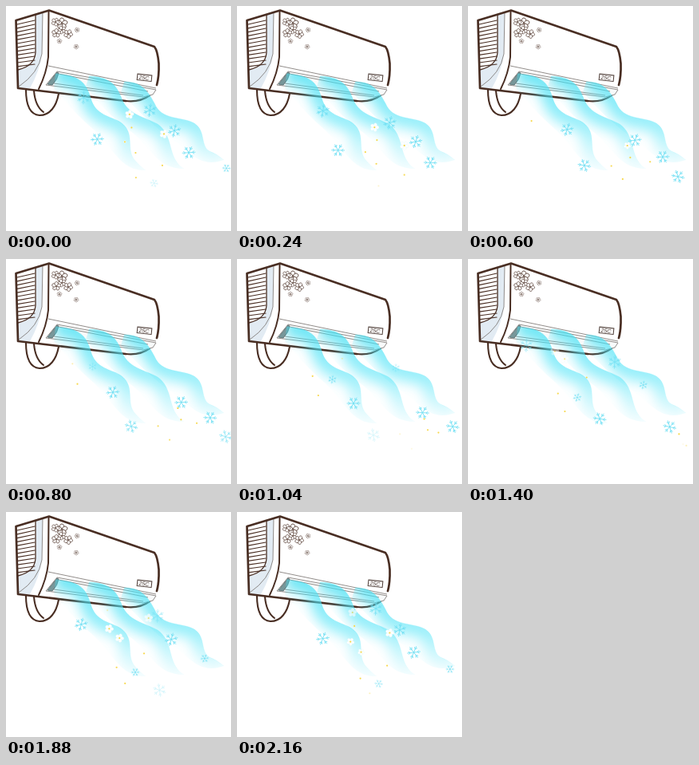
Recreate the animation shown at these times as an HTML page. Size 282x282 px, loop 2.2 s.

```html
<!DOCTYPE html>
<html lang="en">
<head>
<meta charset="utf-8">
<title>Cool breeze</title>
<style>
  html, body { margin: 0; width: 100%; height: 100%; overflow: hidden; background: #fff; }
  svg { display: block; width: 100vw; height: 100vh; }
  .ink { fill: none; stroke: #492e23; stroke-linecap: round; stroke-linejoin: round; }
  .thin { fill: none; stroke: #77706c; stroke-width: .8; }
  text { font: italic 7px "Liberation Sans", Arial, sans-serif; fill: #4b3a34; }
</style>
</head>
<body>
<svg viewBox="0 0 282 282">
  <defs>
    <filter id="soft" filterUnits="userSpaceOnUse" x="0" y="40" width="282" height="242">
      <feGaussianBlur stdDeviation="8"/>
    </filter>
    <linearGradient id="air" gradientUnits="userSpaceOnUse" x1="0" y1="85" x2="0" y2="206">
      <stop offset="0" stop-color="#3fe0f4" stop-opacity=".75"/>
      <stop offset=".55" stop-color="#5ce6f8" stop-opacity=".6"/>
      <stop offset="1" stop-color="#8eeefa" stop-opacity=".1"/>
    </linearGradient>
    <g id="flake" fill="none" stroke="#6fdff3" stroke-width=".1" stroke-linecap="round"></g>
    <g id="petals" fill="#fff" stroke="#d9f6f8" stroke-width=".06"></g>
    <g id="sketch" fill="#fff" stroke="#492e23" stroke-width=".12"></g>
  </defs>

  <!-- drain pipe -->
  <path class="ink" stroke-width="2.1" d="M25 105C25 123 30 136 42 137C55 137 63 126 66 110M35 106C36 119 40 128 47 133"/>

  <!-- cabinet -->
  <path d="M12.5 18L54 5.5L186 51Q192 65 191 85L188 105L172 117L150 119L15 103Z" fill="#fff"/>
  <path d="M37 11L46 8L45 60Q42 82 30 103L15 103V80Q36 75 37 58Z" fill="#e2ebf3"/>
  <path class="thin" d="M46 8L45 60Q41 84 16 101"/>
  <g id="louvers" class="ink" stroke-width="1.2"></g>
  <path class="ink" stroke-width="1.3" d="M37 11V58Q36 75 15 80"/>
  <path class="ink" stroke-width="2" d="M53.5 6L53 64Q51 84 41 104"/>
  <path class="ink" stroke-width="2.7" d="M150 119L15 103L12.5 18L54 5.5L186 51Q190 56 191.5 72Q192 88 189 99"/>
  <path class="ink" stroke-width="2.2" d="M150 119Q168 121 180 112"/>
  <path class="thin" d="M53 75L188 103"/>
  <path d="M64 82L188 105L184 111L172 114L50 99Z" fill="#f8fafa" stroke="#77706c" stroke-width=".8"/>
  <path d="M64 83L52 98L58 99Q65 92 66 84Z" fill="#78979a" stroke="#465f60" stroke-width=".7"/>
  <path class="thin" d="M66 85L178 107M60 97L172 112"/>
  <g transform="rotate(6 173 90)">
    <rect x="164.500" y="86" width="18" height="7.500" fill="#fff" stroke="#4b3a34"/>
    <text x="166.500" y="92.300">25C</text>
  </g>
  <g id="print"></g>

  <g id="wind"></g>
  <g id="drift"></g>
</svg>

<script>
const $ = id => document.getElementById(id);
const range = n => [...Array(n).keys()];
const clamp = v => Math.max(0, Math.min(1, v));
const LOOP = 2.2, CYCLE = 2.3, STEP = .04;

// Unit-size shapes, repeated around the centre
const ring = (n, d) => range(n).map(i => `<path d="${d}" transform="rotate(${i * 360 / n})"/>`).join('');
const petals = ring(5, 'M0 0C-.6 -.35 -.4 -1 0 -1S.6 -.35 0 0Z');
$('flake').innerHTML = ring(6, 'M0 0V-1M-.2 -.8L0 -.55L.2 -.8');
$('petals').innerHTML = petals;
$('sketch').innerHTML = petals + '<circle r=".15"/>';

$('louvers').innerHTML = range(12).map(i => {
  const y = 23 + i * 4.8;
  return `<path d="M14 ${y}L36 ${y - 5 + i * .2}"/>`;
}).join('');

$('print').innerHTML = [[70, 22, 7], [62, 20, 5], [70, 30, 5], [63, 34, 5.5], [78, 35, 5.5],
  [89, 30, 3], [67, 44, 3], [88, 51, 3]].map(([x, y, r], i) =>
  `<use href="#sketch" transform="translate(${x} ${y}) rotate(${i * 25}) scale(${r})"/>`).join('');

// Each stream: its crisp upper edge, then the soft lower side
const streams = [
  ['M62 85C90 87 100 94 106 115C112 138 132 138 144 146C163 160 149 179 162 194Q168 201 175 206',
   'C145 207 135 180 112 157Q85 134 60 103Z'],
  ['M104 88C128 89 138 97 145 116C153 137 174 139 190 148C207 160 204 180 213 194Q217 201 223 204',
   'C190 204 181 178 160 160Q128 138 100 101Z'],
  ['M148 95C169 95 177 105 186 122C195 144 220 138 236 147C251 157 243 175 255 182Q264 185 273 193',
   'C241 204 230 181 208 167Q176 145 144 108Z']
];
$('wind').innerHTML = streams.map(([edge, side], i) => `
  <clipPath id="c${i}"><path d="${edge + side}"/></clipPath>
  <g clip-path="url(#c${i})">
    <path d="${edge}" fill="none" stroke="url(#air)" stroke-width="27" filter="url(#soft)"/>
  </g>
  <path d="${edge}" fill="none" stroke="url(#air)" stroke-width=".8" opacity=".5"/>`).join('');

const kinds = {
  flake: { size: 8, life: 2.15, spin: 25, href: '#flake' },
  mini: { size: 5, life: 1.75, spin: 25, href: '#flake' },
  blossom: { size: 5.5, life: 2.1, spin: 40, href: '#petals', core: true },
  dot: { size: 1, life: 1.9, spin: 0, core: true }
};

// Birth time and place; push and fall are the starting speeds in px/s
const drift = [];
function launch(kind, born, x, y, push = 41, fall = 73) {
  const { href, core } = kinds[kind];
  const g = document.createElementNS('http://www.w3.org/2000/svg', 'g');
  g.innerHTML = (href ? `<use href="${href}"/>` : '') + (core ? '<circle r="1.1" fill="#f7d84b"/>' : '');
  $('drift').append(g);
  drift.push({ ...kinds[kind], kind, g, born, x, y, push, fall });
}

launch('flake', 1.3, 69, 101);
launch('flake', -.15, 91, 104);
launch('flake', 1.25, 177, 119, 45, 69);
launch('flake', 1.8, 186, 125, 48, 66);
launch('flake', 2, 167, 110, 43, 71);
launch('mini', .7, 104, 128, 44, 70);
launch('mini', .95, 194, 131, 55, 63);
launch('blossom', 1.33, 106, 111, 40, 68);
launch('blossom', 1.3, 117, 118);
launch('blossom', 1.75, 173, 124, 43, 70);
launch('blossom', 2.05, 137, 118, 70);
launch('dot', .4, 70, 131, 47, 67);
launch('dot', .75, 81, 128, 46, 67);
launch('dot', 1, 130, 122, 45, 69);
launch('dot', 1.85, 125, 121, 70);

// The wind speeds particles up sideways and slows their fall
function draw(seconds) {
  const time = Math.floor(seconds % LOOP / STEP + .001) * STEP;
  for (const p of drift) {
    const age = time - p.born + (time < p.born ? CYCLE : 0);
    const x = p.x + p.push * age + 4.4 * age ** 2;
    const y = p.y + p.fall * age - 7 * age ** 2;
    const fade = clamp(Math.min((age + .05) / .25, (p.life - age) / .4));
    const size = p.size * (p.kind === 'blossom' ? clamp((1.05 - age) / .25) : 1);
    p.g.setAttribute('opacity', fade);
    p.g.setAttribute('transform', `translate(${x} ${y})`);
    if (p.href) p.g.firstChild.setAttribute('transform', `rotate(${age * p.spin}) scale(${size})`);
  }
}

let start;
function tick(now) {
  start ??= now;
  draw((now - start) / 1000);
  requestAnimationFrame(tick);
}
draw(0);
requestAnimationFrame(tick);
</script>
</body>
</html>
```
